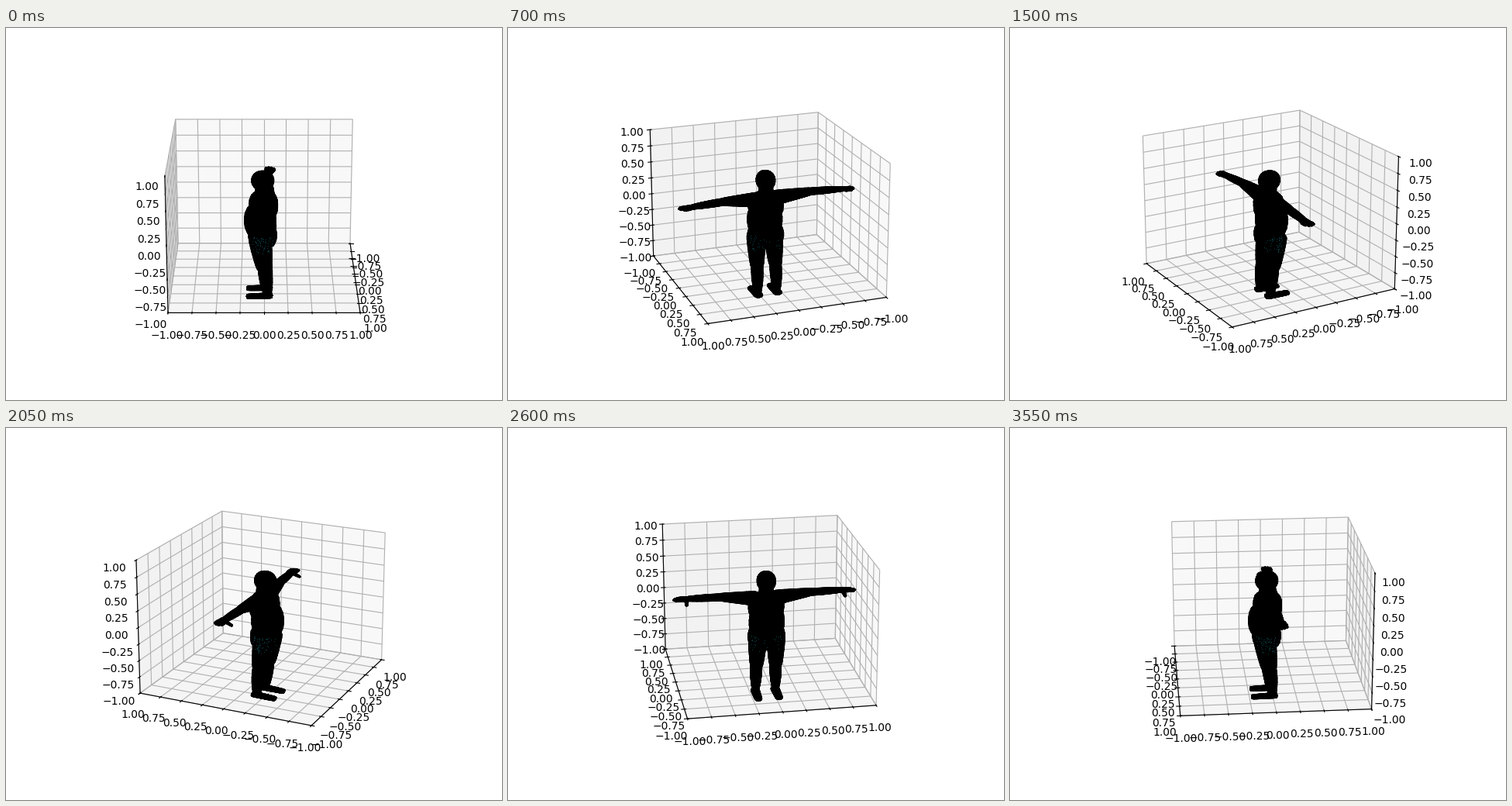
A matplotlib script for the animation above (3600 ms loop, 640 by 480 pixels).

```python
import numpy as np
import matplotlib.pyplot as plt
from matplotlib.animation import FuncAnimation
from mpl_toolkits.mplot3d.art3d import Poly3DCollection

FRAMES = 72
STEP = 360 / FRAMES
ELEV = 20
X, Y, Z = range(3)


def limb(p, q, r0, r1, axis, squash=1, bulge=0, power=8, n=12, sides=16):
    """Quads of a round-ended tube from p to q with rings across the axis.

    squash scales the second ring radius, power sets how blunt the ends are.
    """
    u = np.sin(np.linspace(-np.pi / 2, np.pi / 2, n))[:, None]
    t = (u + 1) / 2
    r = (r0 + (r1 - r0) * t + bulge * np.sin(np.pi * t))
    r = r * (1 - np.abs(u) ** power) ** (1 / power)
    th = np.linspace(0, 2 * np.pi, sides + 1)
    ring = np.stack([0 * r * th, r * np.cos(th), squash * r * np.sin(th)], -1)
    center = np.array(p) + (np.array(q) - p) * t
    pts = center[:, None] + np.roll(ring, axis, axis=-1)
    quads = np.stack([pts[:-1, :-1], pts[1:, :-1], pts[1:, 1:], pts[:-1, 1:]], 2)
    return quads.reshape(-1, 4, 3)


def blob(y, z, rx, ry, rz, power=2.5):
    """Blunt ellipsoid on the body's midplane."""
    return limb((0, y, z - rz), (0, y, z + rz), rx, rx, Z, ry / rx, power=power)


def build_body():
    trunk = [
        blob(-.015, .48, .1, .12, .137, 2.2),                     # head
        limb((0, 0, .2), (0, -.01, .45), .076, .07, Z, 1.2),      # neck
        blob(-.007, .1, .194, .153, .2, 3),                       # chest
        blob(-.043, -.13, .192, .17, .26),                        # belly
        blob(-.016, -.36, .203, .153, .19),                       # hips
    ]
    shoulder, elbow, wrist = (.08, .01, .208), (.52, .035, .254), (.87, .06, .243)
    hip, knee, ankle = (.1, -.05, -.34), (.107, .005, -.86), (.112, .038, -1.24)
    side = [
        limb(shoulder, elbow, .104, .049, X),
        limb((.46, .03, .252), wrist, .047, .03, X, bulge=.006),
        limb((.8, .06, .243), (.96, .066, .238), .05, .05, X, .42, power=4),
        limb((.86, .05, .235), (.87, -.045, .188), .02, .012, Y, n=6, sides=8),
        limb(hip, knee, .1, .064, Z, 1.22, bulge=.004),
        limb((.107, .005, -.78), ankle, .06, .034, Z, 1.18, bulge=.011),
        limb((.112, .09, -1.248), (.115, -.192, -1.26), .034, .027, Y, 1.4),
    ]
    for k in range(4):
        y, tip = .025 + .028 * k, 1.005 - .012 * (k - 1.2) ** 2
        side.append(limb((.88, y, .238), (tip, y, .236), .014, .012, X, n=6, sides=8))
    half = np.concatenate(side)
    return np.concatenate(trunk + [half, half * [-1, 1, 1]])


def build_glints(count=75):
    """Specks of skin colour between the mesh lines at the hips."""
    rng = np.random.default_rng(4)
    th = rng.normal(0, .6, 2 * count) + np.repeat([0, np.pi], count)
    normals = np.column_stack([np.cos(th), np.sin(th)])
    pts = np.column_stack([normals * [.19, .13] - [0, .02],
                           rng.uniform(-.56, -.32, 2 * count)])
    return pts, normals


fig = plt.figure(figsize=(6.4, 4.8), dpi=100)
ax = fig.add_subplot(projection="3d")
ax.add_collection3d(Poly3DCollection(build_body(), facecolor="black",
                                     edgecolor="black", linewidth=1))
glints, glint_normals = build_glints()
specks, = ax.plot([], [], [], ",", color="#083c42", zorder=20)
ax.set(xlim=(-1, 1), ylim=(-1, 1), zlim=(-1, 1))


def update(i):
    azim = i * STEP
    ax.view_init(elev=ELEV, azim=azim)
    a = np.radians(azim)
    facing = glint_normals @ [np.cos(a), np.sin(a)] > .5
    specks.set_data_3d(*glints[facing].T)
    return specks,


anim = FuncAnimation(fig, update, frames=FRAMES, interval=50, repeat=True,
                     init_func=lambda: update(0))
plt.show()
```
